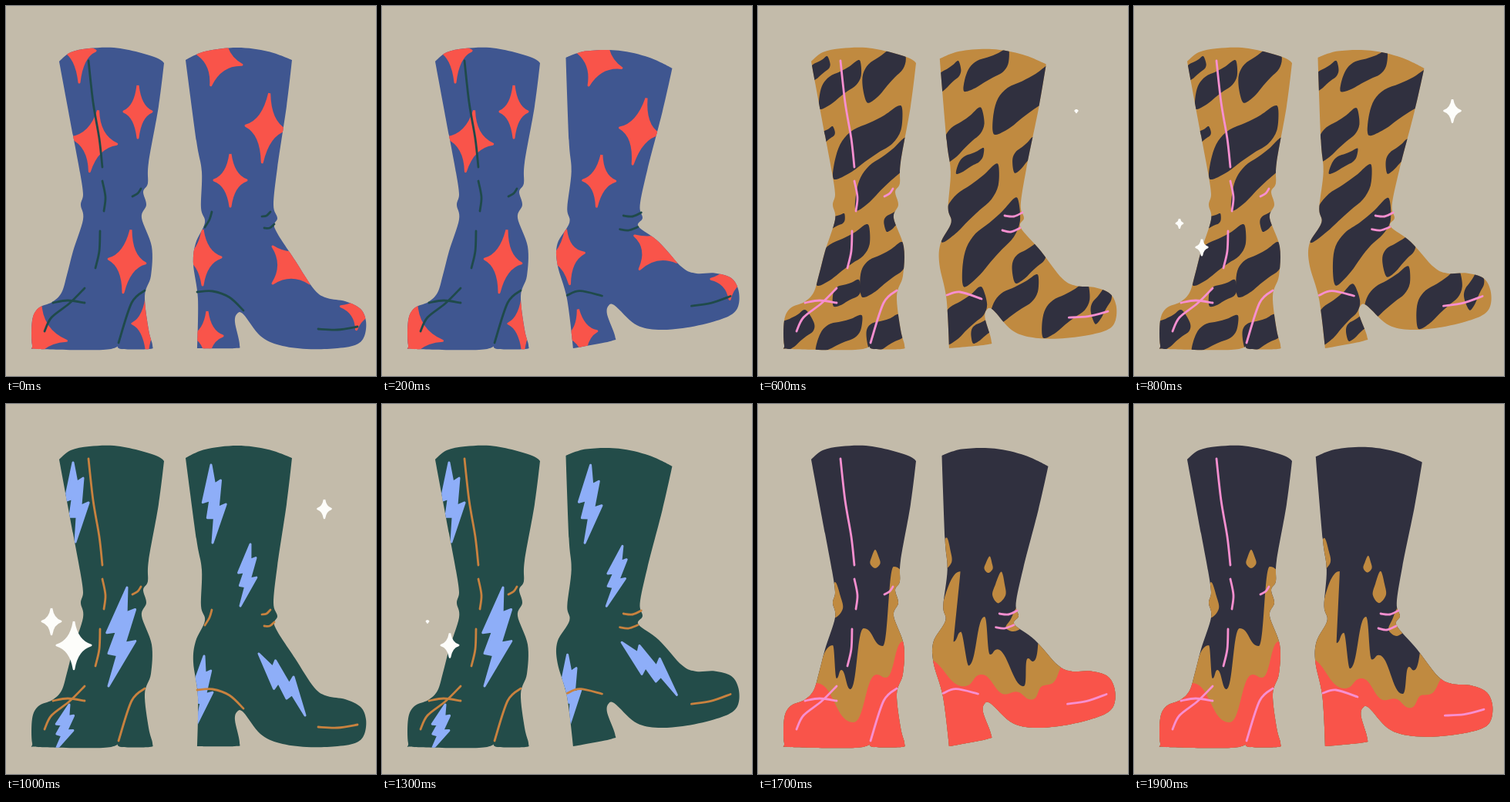
Animation of 480x480 px, one loop 2000 ms. Source, as an HTML page:

```html
<!DOCTYPE html>
<html lang="en">
<head>
<meta charset="utf-8">
<title>Boots</title>
<style>
html, body { margin: 0; width: 100%; height: 100%; overflow: hidden; background: #c3bbaa; }
svg { display: block; width: 100%; height: 100%; }
</style>
</head>
<body>
<svg id="stage" viewBox="0 0 480 480"></svg>
<script>
const stage = document.getElementById('stage');
const STEP = 100, STEPS = 20;
const TILT = [0, .5, 1, 1, .5];
const RED = '#f9544a', NAVY = '#30303f', OCHRE = '#c08a40', PINK = '#f78fd0';

// Outline key points; * marks a sharp corner
const LEFT = `*69 72, 84 60, 108 55, 140 54, 172 60, 197 68, *205 74, 198 130, 185 203, 184 230,
  178 241, 182 258, 176 275, 189 312, 188 350, 180 376, 185 420, 190 440, 186 445, 150 445,
  *145 441, 126 446, 42 445, 34 440, 34 408, 42 392, 60 384, 72 372, 79 349, 87 318, 100 277,
  97 258, 100 244, 96 216, 87 168`;
const RIGHT = `*233 70, 258 59, 300 54, 340 59, *371 70, 364 130, 352 210, 347 258, 352 275,
  349 289, 375 330, 400 368, 417 379, 440 383, 460 393, 467 409, 465 428, 455 439, 430 444,
  390 445, 355 440, 330 428, 308 400, 300 399, 297 410, 303 439, 297 444, *248 444, 249 380,
  243 335, 246 308, 258 281, 253 262, 254 215, 247 175`;

const clamp = v => Math.max(0, Math.min(1, v));
const mix = (a, b, f) => [a[0] + (b[0] - a[0]) * f, a[1] + (b[1] - a[1]) * f];
const fmt = p => p.map(v => v.toFixed(1)).join(' ');
const rows = text => text.split(',').map(r => r.trim().split(/\s+/).map(Number));
const still = p => p;

// The foot pivots on the heel while the shaft leans slightly the other way.
const tilt = k => ([x, y]) => {
  const f = clamp((y - 275) / 55), m = f * f * (3 - 2 * f);
  const shaft = [5.5 - .095 * (y - 70), (.1 * (x - 233) - 3) * clamp((270 - y) / 200)];
  const foot = [.14 * (y - 444), -.19 * (x - 248)];
  const [dx, dy] = mix(shaft, foot, m);
  return [x + dx * k, y + dy * k];
};

// Curve through points, closed unless open is set
function curve(p, open) {
  const n = p.length;
  const at = i => open ? p[Math.max(0, Math.min(n - 1, i))] : p[(i + n) % n];
  const handle = (q, from, to) => q.sharp ? q : [q[0] + (to[0] - from[0]) / 6, q[1] + (to[1] - from[1]) / 6];
  let d = 'M' + fmt(p[0]);
  for (let i = 0; i < (open ? n - 1 : n); i++) {
    const a = at(i), b = at(i + 1);
    d += `C${fmt(handle(a, at(i - 1), b))} ${fmt(handle(b, at(i + 2), a))} ${fmt(b)}`;
  }
  return d;
}

function outline(text, warp) {
  return curve(text.split(',').map(s => {
    const p = warp(s.replace('*', '').trim().split(' ').map(Number));
    p.sharp = s.includes('*');
    return p;
  }));
}

// Points given along and across the line from one end to the other
const along = (x1, y1, x2, y2) => (t, s) =>
  [x1 + (x2 - x1) * t + (y2 - y1) * s, y1 + (y2 - y1) * t - (x2 - x1) * s];

// Centre, radii, turn in degrees
function star([x, y, rx, ry, turn = 0], warp) {
  const a = turn * Math.PI / 180, cos = Math.cos(a), sin = Math.sin(a);
  const tips = [[0, -ry], [rx, 0], [0, ry], [-rx, 0]].map(([u, v]) => [x + u * cos - v * sin, y + u * sin + v * cos]);
  return 'M' + fmt(warp(tips[0])) + tips.map((p, i) => {
    const q = tips[(i + 1) % 4];
    return `Q${fmt(warp(mix(mix(p, q, .5), [x, y], .64)))} ${fmt(warp(q))}`;
  }).join('');
}

// Both ends and the width of a wavy fur patch
function spot([x1, y1, x2, y2, width], warp) {
  const place = along(x1, y1, x2, y2), w = width / Math.hypot(x2 - x1, y2 - y1) / 2;
  const edge = side => [...Array(7).keys()].map(i => {
    const t = (i + .15) / 6.3;
    const swell = Math.sin(Math.PI * t) ** .7 * (1 + .12 * side * Math.sin(t * 9));
    return warp(place(t, w * (side * swell + .25 * Math.sin(2 * Math.PI * t))));
  });
  return curve([...edge(1), ...edge(-1).reverse()]);
}

const BOLT = rows('0 0, .25 .04, .2 .12, .55 .08, .51 .18, 1 0, .68 .03, .68 -.06, .45 -.02, .48 -.115');
function bolt([x1, y1, x2, y2, wide = 1], warp) {
  const place = along(x1, y1, x2, y2);
  return 'M' + BOLT.map(([t, s]) => fmt(warp(place(t, s * wide)))).join('L') + 'Z';
}

// Alternating crests and dips, filled to the floor
function wave(pts, warp) {
  let d = 'M' + fmt(warp(pts[0]));
  pts.slice(1).forEach(([x, y], i) => {
    const [px, py] = pts[i], mid = (px + x) / 2;
    d += `C${[[mid, py], [mid, y], [x, y]].map(p => fmt(warp(p))).join(' ')}`;
  });
  return d + `V480H${pts[0][0] - 40}Z`;
}

// Tip, width and height
function drop([x, y, w, h], warp) {
  return curve([[0, 0], [.35, .4], [.5, .75], [0, 1], [-.5, .75], [-.35, .4]]
    .map(([u, v]) => warp([x + u * w, y + v * h])));
}

const layer = (fill, draw, edge, left, right) => ({ fill, draw, edge, left: rows(left), right: rows(right) });
const swell = (fill, left, right) => ({ fill, draw: wave, edge: 0, left: [rows(left)], right: [rows(right)] });

const THEMES = [
  { base: '#3f5690', line: '#1f4a4a', bias: 0, layers: [
    layer(RED, star, 3,
      '95 58 21 41, 171 137 18 34, 114 175 30 40 8, 157 331 24 41 7, 183 412 19 40, 37 427 42 44 10',
      '275 68 32 36 15, 337 158 26 45 6, 291 226 21 34, 255 326 24 36, 370 336 34 34 45, 459 394 25 26 10, 261 428 20 32')
  ] },
  { base: OCHRE, line: PINK, bias: .5, layers: [
    layer(NAVY, spot, 0,
      `132 70 80 134 30, 90 65 70 97 18, 183 44 142 126 38, 186 129 98 225 44, 97 156 82 179 14,
       193 170 127 266 34, 112 269 90 290 14, 184 262 167 293 18, 143 283 76 363 38, 188 306 135 378 38,
       131 355 98 390 24, 62 394 34 447 38, 135 401 75 449 30, 184 400 146 449 38`,
      `260 71 234 113 20, 325 55 267 111 30, 380 76 306 167 44, 289 131 243 204 32, 293 184 257 218 16,
       357 170 333 217 20, 311 204 238 307 36, 336 248 267 365 40, 368 302 334 360 30, 290 364 244 440 38,
       363 348 300 418 32, 427 357 370 431 36, 452 361 438 413 20, 302 403 279 438 20`)
  ] },
  { base: '#234c49', line: '#c9823f', bias: 0, layers: [
    layer('#8eaef8', bolt, 3,
      '87 76 90 179, 157 238 133 366, 82 390 65 448 1.3',
      '266 79 268 180, 317 182 304 262, 328 324 388 404, 257 327 247 416')
  ] },
  { base: NAVY, line: PINK, bias: 0, layers: [
    swell(OCHRE,
      '20 385, 60 380, 97 313, 102 356, 108 345, 120 370, 137 291, 162 314, 176 211, 215 260',
      '225 330, 271 217, 272 312, 281 298, 287 347, 308 276, 316 338, 325 333, 353 386, 363 352, 369 357, 388 310, 480 340'),
    layer(OCHRE, drop, 0,
      '100 231 20 46, 152 189 13 24',
      '249 174 19 42, 307 196 11 22, 324 216 17 42, 350 262 22 45'),
    swell(RED,
      '20 362, 75 362, 124 413, 154 351, 166 355, 188 308, 215 320',
      '232 328, 280 372, 300 361, 330 392, 340 391, 362 405, 378 390, 386 390, 412 366, 490 366')
  ] }
];

const crease = text => text.split('/').map(rows);
const LEFT_LINES = crease(`107 71, 113 125, 121 172, 125 209 / 125 227, 129 248, 127 266 / 122 292, 121 318, 116 340 /
  164 247, 171 243, 175 237 / 61 385, 80 382, 102 385 / 50 422, 59 404, 82 386, 102 366 / 180 369, 163 385, 146 437`);
const FOOT_LINES = crease('405 419, 430 420, 456 416');
const FLAT_LINES = crease(`248 371, 268 370, 290 378, 308 395 / 267 267, 264 277, 258 287 /
  332 273, 338 272, 343 267 / 335 288, 342 288, 348 283`);
const LIFT_LINES = crease('245 375, 262 371, 290 380 / 320 272, 332 273, 343 268 / 317 291, 328 293, 340 288');

const fillPath = (d, fill, edge) =>
  `<path d="${d}" fill="${fill}" stroke="${fill}" stroke-width="${edge}" stroke-linejoin="round"/>`;
const strokes = (list, warp, colour) => list.map(p =>
  `<path d="${curve(p.map(warp), true)}" fill="none" stroke="${colour}" stroke-width="2.8" stroke-linecap="round"/>`).join('');

function boot(side, shape, theme, warp, patternWarp) {
  const d = outline(shape, warp);
  const pattern = theme.layers.map(l =>
    l[side].map(s => fillPath(l.draw(s, patternWarp), l.fill, l.edge)).join('')).join('');
  return `<clipPath id="${side}"><path d="${d}"/></clipPath>` +
    fillPath(d, theme.base, 0) + `<g clip-path="url(#${side})">${pattern}</g>`;
}

// Grows from start to peak, then shrinks until end
function sparkle(t, x, y, size, start, peak, end) {
  const h = size * clamp(Math.min((t - start) / (peak - start), (end - t) / (end - peak)));
  return h ? fillPath(star([x, y, h * .72, h], still), '#fdfdfa', 2.5) : '';
}

function render(step) {
  const t = step * STEP, k = TILT[step % 5], theme = THEMES[Math.floor(step / 5)];
  const warp = tilt(k);
  stage.innerHTML = '<rect width="480" height="480" fill="#c3bbaa"/>' +
    boot('left', LEFT, theme, still, still) +
    boot('right', RIGHT, theme, warp, tilt(k - theme.bias)) +
    strokes(LEFT_LINES, still, theme.line) +
    strokes(FOOT_LINES, warp, theme.line) +
    (k ? strokes(LIFT_LINES, tilt(k - .5), theme.line) : strokes(FLAT_LINES, still, theme.line)) +
    sparkle(t, 413, 136, 18, 570, 850, 1300) +
    sparkle(t, 59, 282, 17, 700, 1000, 1330) +
    sparkle(t, 88, 313, 31, 700, 1000, 1600);
}

let shown = -1;
function tick() {
  const step = Math.floor(performance.now() / STEP) % STEPS;
  if (step !== shown) render(shown = step);
  requestAnimationFrame(tick);
}
tick();
</script>
</body>
</html>
```
